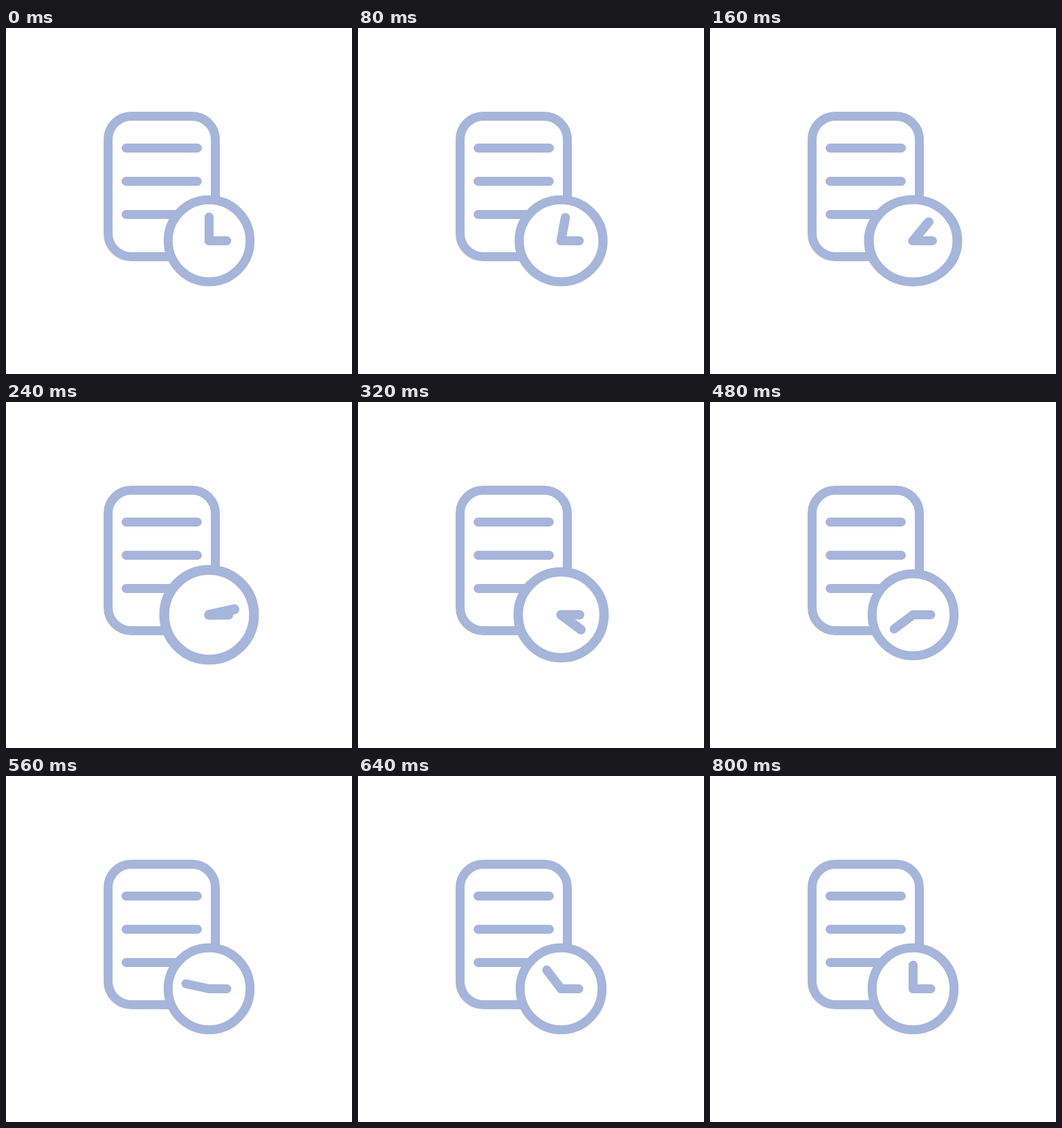
An HTML page that plays this animation: 500x500 px, repeating every 2400 ms.

```html
<!DOCTYPE html>
<html lang="en">
<head>
<meta charset="utf-8">
<title>Document with clock</title>
<style>
  html, body { margin: 0; width: 100%; height: 100%; overflow: hidden; background: #fff; }
  svg { display: block; width: 100vw; height: 100vh; }
  .ink { fill: none; stroke: #a6b5da; stroke-width: 13; stroke-linecap: round; stroke-linejoin: round; }
  .face { fill: #fff; }
</style>
</head>
<body>
<svg viewBox="0 0 500 500">
  <g class="ink">
    <rect x="147.5" y="127.5" width="155" height="203" rx="33.5"/>
    <path d="M173.5 173.5H276.5M173.5 221.5H276.5M173.5 269.5H276.5"/>
    <g id="clock">
      <circle class="face" r="59.2"/>
      <path d="M0 0H25.5"/>
      <path id="minute" d="M0 0V-34.2"/>
    </g>
  </g>
</svg>
<script>
  const LOOP = 2400, STEP = 20, TURN = 800, PEAK = 200, SWELL = 0.12;
  const clock = document.getElementById('clock');
  const minute = document.getElementById('minute');
  const clamp = u => Math.min(1, Math.max(0, u));
  const smooth = u => u * u * (3 - 2 * u);

  // Accelerates up to the peak, then shrinks back at a steady rate.
  function swell(t, power) {
    const u = t < PEAK ? (t / PEAK) ** power : clamp(2 - t / PEAK);
    return 1 + SWELL * u;
  }

  function draw(t) {
    // The width grows early, the height only just before the peak.
    clock.setAttribute('transform',
      `translate(293.5 307.5) scale(${swell(t, 1.8)} ${swell(t, 16)})`);
    minute.setAttribute('transform', `rotate(${360 * smooth(clamp(t / TURN))})`);
  }

  const start = performance.now();
  function tick() {
    const t = (performance.now() - start) % LOOP;
    draw(Math.floor(t / STEP) * STEP);
    requestAnimationFrame(tick);
  }
  draw(0);
  requestAnimationFrame(tick);
</script>
</body>
</html>
```
